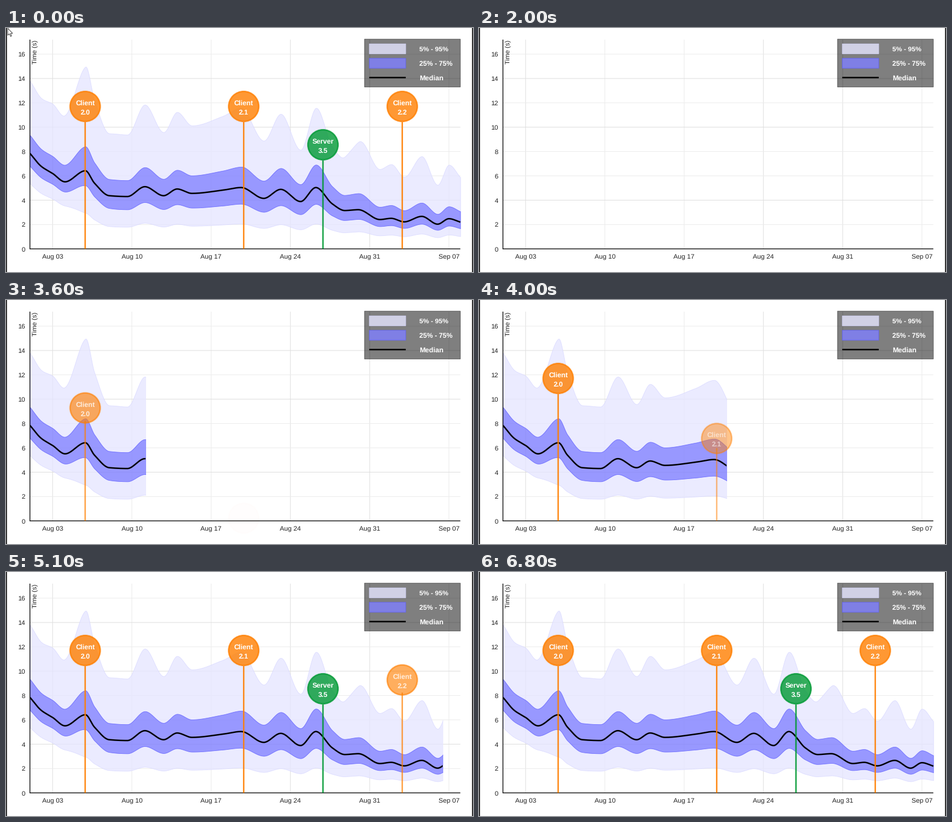
Recreate the animation shown at these times as a matplotlib script. Size 800 by 420 pixels, loop 7100 ms.

```python
import numpy as np
import matplotlib.pyplot as plt
from matplotlib.animation import FuncAnimation
from matplotlib.patches import Circle, Polygon, Rectangle
from matplotlib.transforms import Bbox, TransformedBbox

W, H = 800, 420
FRAMES, STEP = 71, 100
PX = 0.72  # points per pixel at 100 dpi
LEFT, RIGHT, TOP, BASE = 41.0, 778.3, 20, 380.2
DAY, UNIT = 19.4, 20.95
CLEAR, START = 2000, 1974
REVEAL_MS, MARKER_MS = 4000, 1000
FONT = "Liberation Sans"

plt.rcParams.update({"text.hinting": "none", "path.snap": False})


def smooth(x, points):
    """Monotone cubic through (x, y) points, flat at local extremes."""
    xk, yk = np.array(points, float).T
    h = np.diff(xk)
    d = np.diff(yk) / h
    m = np.r_[d[0], np.zeros(len(d) - 1), d[-1]]
    same = d[:-1] * d[1:] > 0
    m[1:-1][same] = (2 * d[:-1] * d[1:])[same] / (d[:-1] + d[1:])[same]
    i = np.clip(np.searchsorted(xk, x, side="right") - 1, 0, len(h) - 1)
    t = (x - xk[i]) / h[i]
    return (yk[i] * (1 + 2 * t) * (1 - t) ** 2 + yk[i + 1] * t * t * (3 - 2 * t)
            + h[i] * (m[i] * t * (1 - t) ** 2 - m[i + 1] * t * t * (1 - t)))


def ease(t):
    t = min(max(t, 0), 1)
    return 4 * t ** 3 if t < 0.5 else 1 - 4 * (1 - t) ** 3


def rgba(r, g, b, a=0.8):
    return r / 255, g / 255, b / 255, a


def day_x(day):
    return LEFT + DAY * day


def value_y(value):
    return BASE - UNIT * value


fig = plt.figure(figsize=(W / 100, H / 100), dpi=100, facecolor="white")
ax = fig.add_axes([0, 0, 1, 1])
ax.set(xlim=(0, W), ylim=(H, 0))
ax.axis("off")


def line(xs, ys, color, width, z, **kw):
    return ax.plot(xs, ys, color=color, lw=width * PX, zorder=z,
                   solid_capstyle="butt", **kw)[0]


def box(x0, y0, x1, y1, fill, edge="none", width=0.0, z=5):
    ax.add_patch(Rectangle((x0, y0), x1 - x0, y1 - y0, facecolor=fill,
                           edgecolor=edge, lw=width * PX, zorder=z))


def label(x, y, text, size=11.4, color="#222222", z=6, **kw):
    return ax.text(x, y, text, fontsize=size * PX, family=FONT, color=color,
                   va="baseline", rotation_mode="anchor", zorder=z, **kw)


def draw_axes():
    strong, faint = "#dedede", "#ececec"
    for week, name in enumerate(["Aug 03", "Aug 10", "Aug 17", "Aug 24", "Aug 31", "Sep 07"]):
        x = day_x(2 + 7 * week)
        line([x, x], [TOP, BASE], strong if week in (0, 3, 4) else faint, 1, 1, snap=True)
        label(x, 397, name, ha="center")
    for value in range(0, 17, 2):
        y = value_y(value)
        if value:
            line([LEFT, RIGHT], [y, y], strong if value in (4, 10, 14) else faint, 1, 1, snap=True)
        label(33.2, y + 4.2, str(value), ha="right")
    line([LEFT, LEFT], [TOP, BASE + 0.6], "black", 1.3, 5)
    line([LEFT, RIGHT], [BASE, BASE], "black", 1.3, 5)
    label(54.2, 61.5, "Time (s)", rotation=90, ha="left")
    box(0, 0, 1.6, H, "#0c0c0c", z=20)
    box(W - 1.6, 0, W, H, "#0c0c0c", z=20)


OUTER, OUTER_EDGE = rgba(230, 230, 255), rgba(216, 216, 255)
INNER, INNER_EDGE = rgba(127, 127, 255), rgba(96, 96, 255)


def draw_legend():
    box(614.1, 19.1, 778.3, 101.6, (0, 0, 0, 0.5), (0, 0, 0, 0.5), 0.9, 4)
    box(622.3, 27.3, 684.8, 44.4, OUTER, OUTER_EDGE, 0.9)
    box(622.3, 52.1, 684.8, 69.2, INNER, INNER_EDGE, 0.9)
    line([622.3, 684.8], [85.3, 85.3], "black", 2.5, 5)
    for row, (text, size) in enumerate([("5% - 95%", 11.5), ("25% - 75%", 11.6), ("Median", 12)]):
        label(708.5, 40.3 + 24.6 * row, text, size, "white", weight="bold")


# Median time in seconds at its turning points, by days since Aug 1.
MEDIAN = [(0, 7.85), (1, 6.78), (2, 6.2), (3.1, 5.51), (4.9, 6.42), (5.7, 5.4),
          (7, 4.37), (8.6, 4.3), (10.15, 5.11), (11.8, 4.37), (13, 4.92),
          (14.3, 4.56), (17, 4.82), (18.65, 5.04), (20.65, 4.15), (22.15, 4.89),
          (23.9, 3.89), (25.25, 5.04), (26.7, 3.7), (27.8, 3.15), (29, 3.22),
          (30.9, 2.41), (31.9, 2.51), (33.05, 2.22), (34.6, 2.67), (36, 2.03),
          (37, 2.48), (38, 2.2)]
SPREAD_DAYS = (0, 3, 5, 8, 25, 31, 38)


def draw_bands():
    days = np.linspace(0, (RIGHT - LEFT) / DAY, 1475)
    median = smooth(days, MEDIAN)

    def percentile(*spread, power=1):
        factor = smooth(days, list(zip(SPREAD_DAYS, spread)))
        return value_y(factor * median ** power)

    p95 = percentile(0.855, 1.09, 1.22, 1.31, 1.3, 2.0, 2.03, power=1.35)
    p75 = percentile(1.19, 1.25, 1.31, 1.31, 1.37, 1.43, 1.4)
    p25 = percentile(0.866, 0.853, 0.81, 0.755, 0.73, 0.77, 0.765)
    p05 = percentile(0.684, 0.646, 0.458, 0.42, 0.41, 0.455, 0.47)

    def band(a, b, fill, edge, z):
        return ax.fill_between(day_x(days), a, b, facecolor=fill, edgecolor=edge,
                               lw=0.85 * PX, zorder=z)

    return [band(p95, p75, OUTER, OUTER_EDGE, 2), band(p25, p05, OUTER, OUTER_EDGE, 2),
            band(p75, p25, INNER, INNER_EDGE, 2.5),
            line(day_x(days), value_y(median), "black", 2.5, 3)]


class Marker:
    RADIUS = 25.8
    START_Y = 377.5

    def __init__(self, day, kind, version, delay):
        server = kind == "Server"
        self.rgb = (0, 153, 51) if server else (255, 127, 0)
        self.end_y = 201 if server else 135
        self.delay = delay
        self.x = day_x(day) - 2.4
        z = 10 + delay / 1000
        self.stem = line([self.x] * 2, [BASE, BASE], "black", 2.5, z)
        self.disc = ax.add_patch(Circle((self.x, 0), self.RADIUS, lw=2.5 * PX, zorder=z + 0.1))
        style = dict(size=11.9, color="white", weight="bold", ha="center", z=z + 0.2)
        self.texts = [label(self.x, 0, kind, **style), label(self.x, 0, version, **style)]

    def update(self, elapsed):
        e = ease((elapsed - self.delay) / MARKER_MS)
        y = self.START_Y + (self.end_y - self.START_Y) * e
        color = rgba(*self.rgb, 0.8 * e)
        self.stem.set_data([self.x] * 2, [min(y + 2.5 + 24.5 * e, BASE), BASE])
        self.stem.set_color(rgba(*self.rgb, 0.9 * e))
        self.disc.center = self.x, y
        self.disc.set_facecolor(color)
        self.disc.set_edgecolor(color)
        for text, offset in zip(self.texts, (-2, 14)):
            text.set_y(y + offset)
            text.set_alpha(e)
        for part in (self.stem, self.disc, *self.texts):
            part.set_visible(e > 0.002)


draw_axes()
draw_legend()
bands = draw_bands()
releases = [(5, "Client", "2.0"), (19, "Client", "2.1"), (26, "Server", "3.5"), (33, "Client", "2.2")]
markers = [Marker(*release, 1000 + 500 * i) for i, release in enumerate(releases)]
pointer = ax.add_patch(Polygon(
    [(3, 0.5), (3, 12.5), (5.8, 10), (7.8, 14.5), (9.6, 13.7), (7.7, 9.4), (11.3, 9.2)],
    facecolor="white", edgecolor="#333333", lw=0.9 * PX, zorder=21))


def update(frame):
    now = frame * STEP
    # Until the chart clears, it shows the finished state.
    elapsed = now - START if now >= CLEAR else 2 * REVEAL_MS
    width = (RIGHT + 0.5 - LEFT) * ease(elapsed / REVEAL_MS)
    clip = TransformedBbox(Bbox.from_bounds(LEFT / W, 0, width / W, 1), fig.transFigure)
    for part in bands:
        part.set_clip_box(clip)
        part.set_visible(width > 0.5)
    for marker in markers:
        marker.update(elapsed)
    pointer.set_visible(frame == 0)
    return []


animation = FuncAnimation(fig, update, frames=FRAMES, interval=STEP, repeat=True,
                          repeat_delay=0, blit=False)
plt.show()
```
